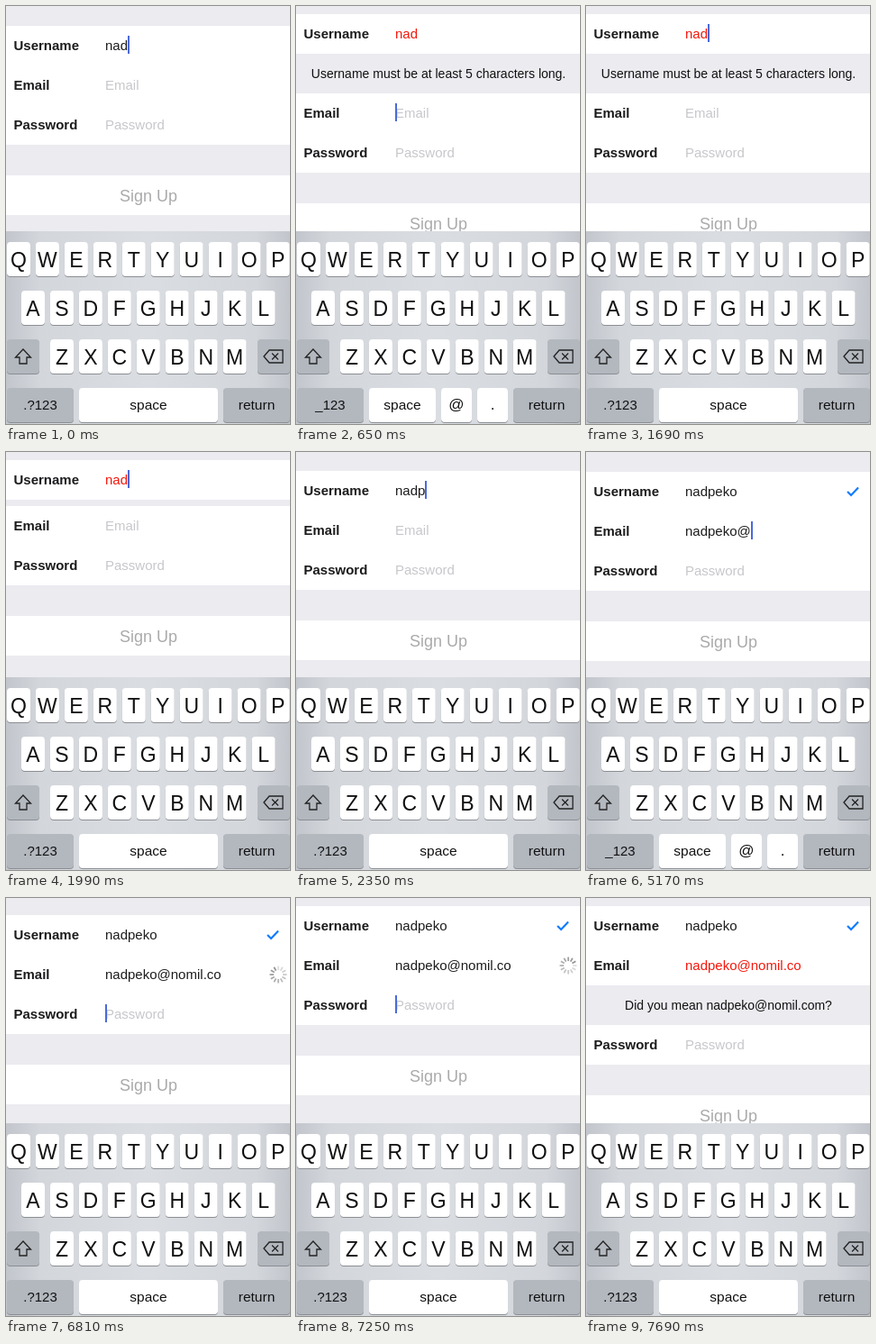
Animation, 315 px wide and 464 px high, one loop 7990 ms. Source, as an HTML page with a canvas:

```html
<!DOCTYPE html>
<html lang="en">
<head>
<meta charset="utf-8">
<title>Sign-up form</title>
<style>
html, body { margin: 0; width: 100%; height: 100%; overflow: hidden; background: #ebebf0; }
canvas { display: block; }
</style>
</head>
<body>
<canvas id="stage" width="315" height="464"></canvas>
<script>
const ctx = document.getElementById('stage').getContext('2d');
const LOOP = 7990, W = 315, H = 464, ROW = 44, KEYS_TOP = 250;
const SANS = '"Liberation Sans", Arial, sans-serif';
const RED = '#f5170c', INK = '#1c1c1e', GREY = '#ebebf0';
const LABELS = ['Username', 'Email', 'Password'];
const USER = 'nadpeko', MAIL = USER + '@nomil.co';
const HINTS = ['Username must be at least 5 characters long.', `Did you mean ${MAIL}m?`];

const START = {
  user: 3, mail: 0,          // characters typed
  focus: 0, caret: 1,        // focused row, caret opacity
  scroll: 0, hint: 0, open: 0, // hint row index and its open height
  bad: -1, busy: -1, ok: false
};

// Each entry changes part of the state from its time onwards.
const STEPS = [
  [140, { focus: 1, bad: 0 }],
  [310, { scroll: 3, open: 12 }],
  [480, { scroll: 11, open: 36 }],
  [650, { scroll: 13, open: ROW }],
  [1100, { caret: .4 }],
  [1250, { caret: 0 }],
  [1540, { focus: 0, caret: 1 }],
  [1840, { open: 30 }],
  [1990, { open: 7 }],
  [2200, { open: 0, scroll: 8 }],
  [2340, { scroll: 1, user: 4, bad: -1 }],
  [2490, { scroll: 0, user: 5 }],
  [2640, { user: 6 }],
  [2780, { user: 7 }],
  [3230, { focus: 1, busy: 0 }],
  [3380, { busy: -1, ok: true }],
  ...[3980, 4120, 4270, 4420, 4570, 4720, 4870, 5170, 5320, 5470].map((t, i) => [t, { mail: i + 1 }]),
  [5610, { mail: 12 }],
  [5760, { mail: 14 }],
  [6060, { mail: 15 }],
  [6210, { mail: 16 }],
  [6660, { focus: 2, busy: 1 }],
  [6810, { scroll: 3 }],
  [6960, { scroll: 13 }],
  [7400, { busy: -1, bad: 1, hint: 1, open: 24 }],
  [7550, { open: ROW, caret: .4 }],
  [7690, { caret: 0 }]
];

function stateAt(t) {
  const s = { ...START };
  for (const [at, patch] of STEPS) if (at <= t) Object.assign(s, patch);
  return s;
}

function rect(x, y, w, h, color) {
  ctx.fillStyle = color;
  ctx.fillRect(x, y, w, h);
}

function text(str, x, y, size, color, align = 'left', weight = 'normal') {
  ctx.font = `${weight} ${size}px ${SANS}`;
  ctx.textAlign = align;
  ctx.fillStyle = color;
  ctx.fillText(str, x, y);
}

function stroke(points, color, width, close) {
  ctx.beginPath();
  points.forEach(([x, y]) => ctx.lineTo(x, y));
  if (close) ctx.closePath();
  ctx.strokeStyle = color;
  ctx.lineWidth = width;
  ctx.stroke();
}

function spinner(cx, cy, t) {
  const turn = Math.floor(t / 150);
  for (let i = 0; i < 12; i++) {
    const a = i * Math.PI / 6, c = Math.cos(a), s = Math.sin(a);
    const shade = .2 + .45 * ((i - turn % 12 + 12) % 12) / 11;
    stroke([[cx + 5 * c, cy + 5 * s], [cx + 9.5 * c, cy + 9.5 * s]], `rgba(90,90,95,${shade})`, 1.8);
  }
}

function field(i, y, s, t) {
  const mid = y + 22;
  const value = [USER.slice(0, s.user), MAIL.slice(0, s.mail), ''][i];
  rect(0, y, W, ROW, '#fff');
  text(LABELS[i], 8.5, mid + 5, 15, INK, 'left', 'bold');
  text(value || LABELS[i], 110, mid + 5, 15, !value ? '#c7c7cc' : s.bad === i ? RED : INK);
  if (s.focus === i) {
    const x = 110 + (value ? ctx.measureText(value).width : 0);
    ctx.globalAlpha = s.caret;
    rect(Math.round(x), mid - 11, 2, 20, '#4a69dc');
    ctx.globalAlpha = 1;
  }
  if (i === 0 && s.ok) stroke([[290, mid], [294, mid + 4], [302, mid - 4.5]], '#107bff', 2.2);
  if (s.busy === i) spinner(302, mid, t);
}

function hint(y, s) {
  ctx.save();
  ctx.beginPath();
  ctx.rect(0, y, W, s.open);
  ctx.clip();
  text(HINTS[s.hint], W / 2 + .5, y + 27, 14, '#111', 'center');
  ctx.restore();
}

function form(s, t) {
  rect(0, 0, W, H, GREY);
  let y = 22 - s.scroll;
  for (let i = 0; i < 3; i++) {
    field(i, y, s, t);
    y += ROW;
    if (s.open && s.hint === i) {
      hint(y, s);
      y += s.open;
    }
  }
  rect(0, y + 34, W, ROW, '#fff');
  text('Sign Up', 158, y + 63, 18, '#aaaaac', 'center');
}

function key(x, y, w, label, size = 15.5, dark = false) {
  const face = (dy, color) => {
    ctx.beginPath();
    ctx.roundRect(x, y + dy, w, 38, 4);
    ctx.fillStyle = color;
    ctx.fill();
  };
  face(1, '#8b8e93');
  face(0, dark ? '#b3b8bf' : '#fff');
  text(label, x + w / 2, y + (size > 20 ? 28 : 24), size, '#111', 'center');
}

function keyboard(mailKeys) {
  const g = ctx.createLinearGradient(0, 0, W, 0);
  [['0', '#c2c6cc'], ['.12', '#d3d6db'], ['.5', '#dadde1'], ['.88', '#d3d6db'], ['1', '#c2c6cc']]
    .forEach(([p, c]) => g.addColorStop(+p, c));
  rect(0, KEYS_TOP, W, H - KEYS_TOP, g);

  [['QWERTYUIOP', 1], ['ASDFGHJKL', 17], ['ZXCVBNM', 49]].forEach(([row, x], r) =>
    [...row].forEach((c, i) => key(x + i * 31.95, 262 + r * 54, 26, c, 23)));

  key(1, 370, 36, '', 15, true);
  stroke([[19, 381], [27.5, 390], [23, 390], [23, 397], [15, 397], [15, 390], [10.5, 390]], '#222', 1.3, true);
  key(279, 370, 36, '', 15, true);
  stroke([[286, 389], [292, 382], [307, 382], [307, 396], [292, 396]], '#222', 1.3, true);
  stroke([[295, 385.5], [302, 392.5]], '#222', 1.3);
  stroke([[302, 385.5], [295, 392.5]], '#222', 1.3);

  key(1, 424, 74, mailKeys ? '_123' : '.?123', 15, true);
  key(81, 424, mailKeys ? 74 : 154, 'space');
  if (mailKeys) {
    key(161, 424, 34, '@', 17);
    key(201, 424, 34, '.', 17);
  }
  key(241, 424, 74, 'return', 15.5, true);
}

function draw(now) {
  const t = now % LOOP, s = stateAt(t);
  form(s, t);
  keyboard(s.focus === 1);
}

const begin = performance.now();
function tick() {
  draw(performance.now() - begin);
  requestAnimationFrame(tick);
}
tick();
</script>
</body>
</html>
```
